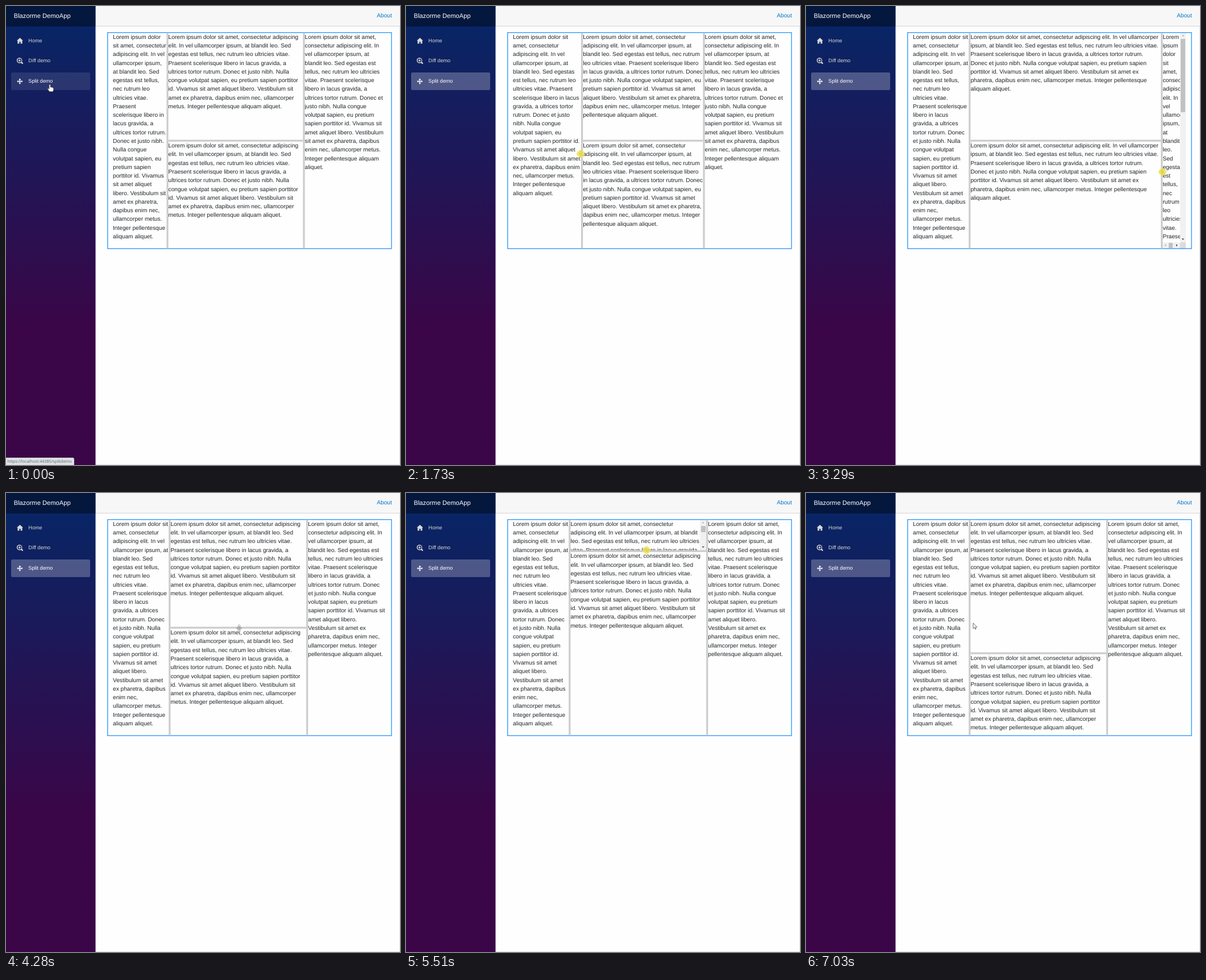
Recreate the animation shown at these times as an HTML page. Size 693 by 808 pixels, loop 7120 ms.

```html
<!DOCTYPE html>
<html lang="en">
<head>
<meta charset="utf-8">
<title>Split demo</title>
<style>
html, body { margin: 0; width: 100%; height: 100%; overflow: hidden; }
body {
  position: relative; background: #fefefe; color: #212529;
  font: 10.17px/15.26px "Liberation Sans", Arial, sans-serif;
  text-rendering: geometricPrecision;
}
div, svg, a { position: absolute; box-sizing: border-box; }
.sidebar {
  left: 0; top: 0; width: 158px; height: 808px; clip-path: inset(0 .5px 0 0);
  background: linear-gradient(180deg, rgb(5, 39, 103) 0%, #3a0647 70%);
}
.brand {
  left: 0; top: 0; width: 100%; height: 35.6px; padding-left: 13.7px;
  background: rgba(0, 0, 0, .4); color: #fff; font-size: 11.18px; line-height: 36.4px;
}
.nav {
  left: 9px; width: 138.5px; height: 30.5px; padding-left: 30.3px;
  border-radius: 2.5px; color: #d7d7d7; font-size: 9.15px; line-height: 31px;
}
.nav svg { left: 9.5px; top: 10px; width: 11px; height: 11px; fill: #d7d7d7; }
#split { color: #fff; background: rgba(255, 255, 255, .1); }
#split.active { background: rgba(255, 255, 255, .25); }
#split svg { fill: #fff; }
.top {
  left: 158px; top: 0; right: 0; height: 35.8px;
  background: #f7f7f7; border-bottom: 1px solid #d6d5d5;
}
.top a { right: 14.2px; top: 10.3px; color: #0077cc; }
.edge { left: 158px; top: 35.8px; right: 0; bottom: 0; border: solid #e2e2e2; border-width: 0 1px 1px 0; }
.pane { overflow: hidden; }
.text { top: .5px; }
.bar { background: #f1f1f1; }
.corner { background: #dcdcdc; }
.thumb { background: #c1c1c1; }
.arrow { width: 4.6px; height: 2.6px; background: #505050; clip-path: polygon(0 0, 100% 0, 50% 100%); }
.arrow.off { background: #a3a3a3; }
#status {
  left: -1px; bottom: -1px; width: 120.5px; height: 13.8px; padding-left: 2.6px;
  background: #dee1e6; border: 1px solid #c3c6ca; border-radius: 0 2.5px 0 0;
  color: #5f6368; font: 7.2px/12px "Open Sans", "Noto Sans", sans-serif; white-space: nowrap;
}
#overlay { left: 0; top: 0; width: 693px; height: 808px; }
.frame { fill: none; stroke: #1e90ff; stroke-width: 1.27; }
.gutter { fill: #ccc; }
#spot path { fill: #fff; stroke: #333; stroke-width: .7; stroke-linejoin: round; }
#spot .resize { stroke: #555; stroke-width: .5; }
#glow { fill: #fbec3c; opacity: .68; }
</style>
</head>
<body>
<div class="sidebar">
  <div class="brand">Blazorme DemoApp</div>
  <div class="nav" style="top:45.6px"><svg viewBox="0 0 8 8"><path d="M4 0 0 3.6h1V7.4h2.2V5h1.6v2.4H7V3.6h1z"/></svg>Home</div>
  <div class="nav" style="top:81.3px"><svg viewBox="0 0 8 8"><path fill-rule="evenodd" d="M3.5 0a3.5 3.5 0 1 0 1.7 6.5L6.6 7.8A.8.8 0 0 0 7.8 6.6L6.4 5.2A3.5 3.5 0 0 0 3.5 0zm0 1a2.5 2.5 0 1 1 0 5 2.5 2.5 0 0 1 0-5zM3 2v1H2v1h1v1h1V4h1V3H4V2z"/></svg>Diff demo</div>
  <div class="nav" id="split" style="top:117px"><svg viewBox="0 0 8 8"><path d="M3.9.4 2.4 2.1h1v1.5H1.9v-1L.2 4.1l1.7 1.5v-1h1.5v1.5h-1l1.5 1.7 1.5-1.7h-1V4.6h1.5v1L7.6 4.1 5.9 2.6v1H4.4V2.1h1z"/></svg>Split demo</div>
</div>
<div class="edge"></div>
<div class="top"><a>About</a></div>
<div id="stage"></div>
<div id="status">https://localhost:44385/splitdemo</div>
<svg id="overlay" viewBox="0 0 693 808">
  <defs><path id="splitter" d="M-1.6-5.2h1V5.2h-1zM.6-5.2h1V5.2h-1zM-6.8 0l3.2-3.3v2.6h2v1.4h-2v2.6zM6.8 0 3.6-3.3v2.6h-2v1.4h2v2.6z"/></defs>
  <rect class="frame" x="178.75" y="46.8" width="499.3" height="380.3"/>
  <rect class="gutter"/><rect class="gutter"/><rect class="gutter"/>
  <g id="spot">
    <path data-shape="hand" d="M-1.2.6Q0-.7 1.2.6V5Q2.4 4.2 3.3 5.2 4.5 4.6 5.2 5.8 6.6 5.4 6.7 7V9.6L5.6 12.8H-.7L-3.7 8.2Q-4 6.6-2.4 7L-1.2 8.2z"/>
    <path data-shape="arrow" d="M0 0V9.6L2.2 7.6 3.7 11 5.2 10.3 3.7 7.1H6.8z"/>
    <use class="resize" data-shape="col" href="#splitter" fill="#fff"/>
    <use class="resize" data-shape="row" href="#splitter" fill="#fff" transform="rotate(90) scale(1 .75)"/>
    <circle id="glow" r="6.8"/>
  </g>
</svg>
<script>
const LOREM = "Lorem ipsum dolor sit amet, consectetur adipiscing elit. In vel ullamcorper ipsum, " +
  "at blandit leo. Sed egestas est tellus, nec rutrum leo ultricies vitae. Praesent scelerisque libero " +
  "in lacus gravida, a ultrices tortor rutrum. Donec et justo nibh. Nulla congue volutpat sapien, " +
  "eu pretium sapien porttitor id. Vivamus sit amet aliquet libero. Vestibulum sit amet ex pharetra, " +
  "dapibus enim nec, ullamcorper metus. Integer pellentesque aliquam aliquet.";
const LOOP = 7120, TICK = 108, BAR = 10.8, HALF = 1.6;
const LEFT = 188, RIGHT = 668.4, TOP = 47.3, BOTTOM = 426.8;

const smooth = p => p * p * (3 - 2 * p);
const easeOut = p => Math.sin(p * Math.PI / 2);

// Pointer x, y and the centres of the three gutters a, b, c.
const rest = { x: 77, y: 138, a: 284, b: 524, c: 237.1 };
const moves = [
  { from: 100, until: 400, shape: "col", to: { x: 285, y: 212 } },
  { from: 640, until: 1080, shape: "col", drag: true, to: { x: 417, y: 236, a: 417 } },
  { from: 1190, until: 2060, shape: "col", drag: true, ease: easeOut, to: { x: 285, y: 265, a: 287.8 } },
  { from: 2160, until: 2530, shape: "col", to: { x: 524, y: 267.5 } },
  { from: 2760, until: 3290, shape: "col", drag: true, to: { x: 627, y: 292, b: 625.8 } },
  { from: 3520, until: 4150, shape: "col", drag: true, to: { x: 530, y: 295, b: 529.7 } },
  { from: 4280, until: 4280, shape: "row", to: { x: 410, y: 238 } },
  { from: 4650, until: 5280, shape: "row", drag: true, to: { x: 424, y: 90, c: 92 } },
  { from: 5410, until: 6040, shape: "row", drag: true, to: { x: 415, y: 231, c: 231 } },
  { from: 6170, until: 6830, shape: "row", drag: true, ease: easeOut, to: { x: 382, y: 276, c: 282.1 } },
  { from: 6930, until: 7030, shape: "arrow", to: { x: 294, y: 229 } },
];

// The screen refreshes about every TICK ms, so progress advances in even steps.
function progress({ from, until }, t) {
  const steps = Math.round((until - from) / TICK);
  if (!steps) return 1;
  let k = 0;
  while (k < steps && t >= Math.floor((from + (until - from) * (k + 1) / steps) / 10) * 10) k++;
  return k / steps;
}

function stateAt(t) {
  const state = { ...rest, shape: "hand", drag: false, active: t >= moves[0].from, status: t < 200 };
  for (const { from, until, shape, drag = false, ease = smooth, to } of moves) {
    if (t < from) break;
    const p = progress({ from, until }, t);
    for (const key in to) state[key] += (to[key] - state[key]) * ease(p);
    state.drag = drag;
    if (drag || p === 1) state.shape = shape;
    else if (p > 0) state.shape = "arrow";
  }
  return state;
}

const $ = id => document.getElementById(id);
const stage = $("stage");
const gutters = document.querySelectorAll(".gutter");

function add(parent, cls, text = "") {
  const el = document.createElement("div");
  el.className = cls;
  el.textContent = text;
  parent.append(el);
  return el;
}

function show(el, on) {
  el.style.display = on ? "" : "none";
}

function place(el, x, y, w, h) {
  Object.assign(el.style, { left: x + "px", top: y + "px", width: w + "px", height: h + "px" });
}

function placeRect(el, x, y, width, height) {
  for (const [name, value] of Object.entries({ x, y, width, height })) el.setAttribute(name, value);
}

function makeBar(pane, vertical) {
  const el = add(pane, "bar"), thumb = add(el, "thumb");
  const arrows = [add(el, "arrow off"), add(el, "arrow")];
  return (x, y, length, ratio) => {
    show(el, length);
    const size = Math.max(6.8, (length - 2 * BAR) * ratio), mid = BAR / 2;
    place(el, x, y, vertical ? BAR : length, vertical ? length : BAR);
    if (vertical) place(thumb, 1.3, BAR, BAR - 2.5, size);
    else place(thumb, BAR, 1.3, size, BAR - 2.5);
    arrows.forEach((arrow, i) => {
      const along = i ? length - mid : mid;
      arrow.style.left = (vertical ? mid : along) - 2.3 + "px";
      arrow.style.top = (vertical ? along : mid) - 1.3 + "px";
      arrow.style.transform = `rotate(${(vertical ? 180 : 90) - 180 * i}deg)`;
    });
  };
}

function makePane() {
  const pane = add(stage, "pane"), text = add(pane, "text", LOREM);
  const vBar = makeBar(pane, true), hBar = makeBar(pane, false), corner = add(pane, "corner");
  const textHeight = () => text.getBoundingClientRect().height;
  return (x, y, x2, y2) => {
    const w = x2 - x, h = y2 - y;
    place(pane, x, y, w, h);
    text.style.width = w + "px";
    const tall = textHeight() > h;
    const innerW = w - (tall ? BAR : 0);
    text.style.width = innerW + "px";
    const wide = text.scrollWidth > innerW + 1;
    const innerH = h - (wide ? BAR : 0);
    vBar(innerW, 0, tall ? innerH : 0, innerH / textHeight());
    hBar(0, innerH, wide ? innerW : 0, innerW / text.scrollWidth);
    show(corner, tall && wide);
    place(corner, innerW, innerH, BAR, BAR);
  };
}

const [left, upper, lower, right] = Array.from({ length: 4 }, makePane);

function draw({ x, y, a, b, c, shape, drag, active, status }) {
  left(LEFT, TOP, a - HALF, BOTTOM);
  upper(a + HALF, TOP, b - HALF, c - HALF);
  lower(a + HALF, c + HALF, b - HALF, BOTTOM);
  right(b + HALF, TOP, RIGHT, BOTTOM);
  placeRect(gutters[0], a - HALF, TOP, 2 * HALF, BOTTOM - TOP);
  placeRect(gutters[1], b - HALF, TOP, 2 * HALF, BOTTOM - TOP);
  placeRect(gutters[2], a + HALF, c - HALF, b - a - 2 * HALF, 2 * HALF);

  $("split").classList.toggle("active", active);
  show($("status"), status);
  $("spot").setAttribute("transform", `translate(${x} ${y})`);
  for (const el of document.querySelectorAll("[data-shape]")) show(el, el.dataset.shape === shape);
  show($("glow"), drag);
}

let shown = "";
const start = performance.now();
function loop() {
  const state = stateAt((performance.now() - start) % LOOP);
  const key = JSON.stringify(state);
  if (key !== shown) draw(state);
  shown = key;
  requestAnimationFrame(loop);
}
loop();
</script>
</body>
</html>
```
